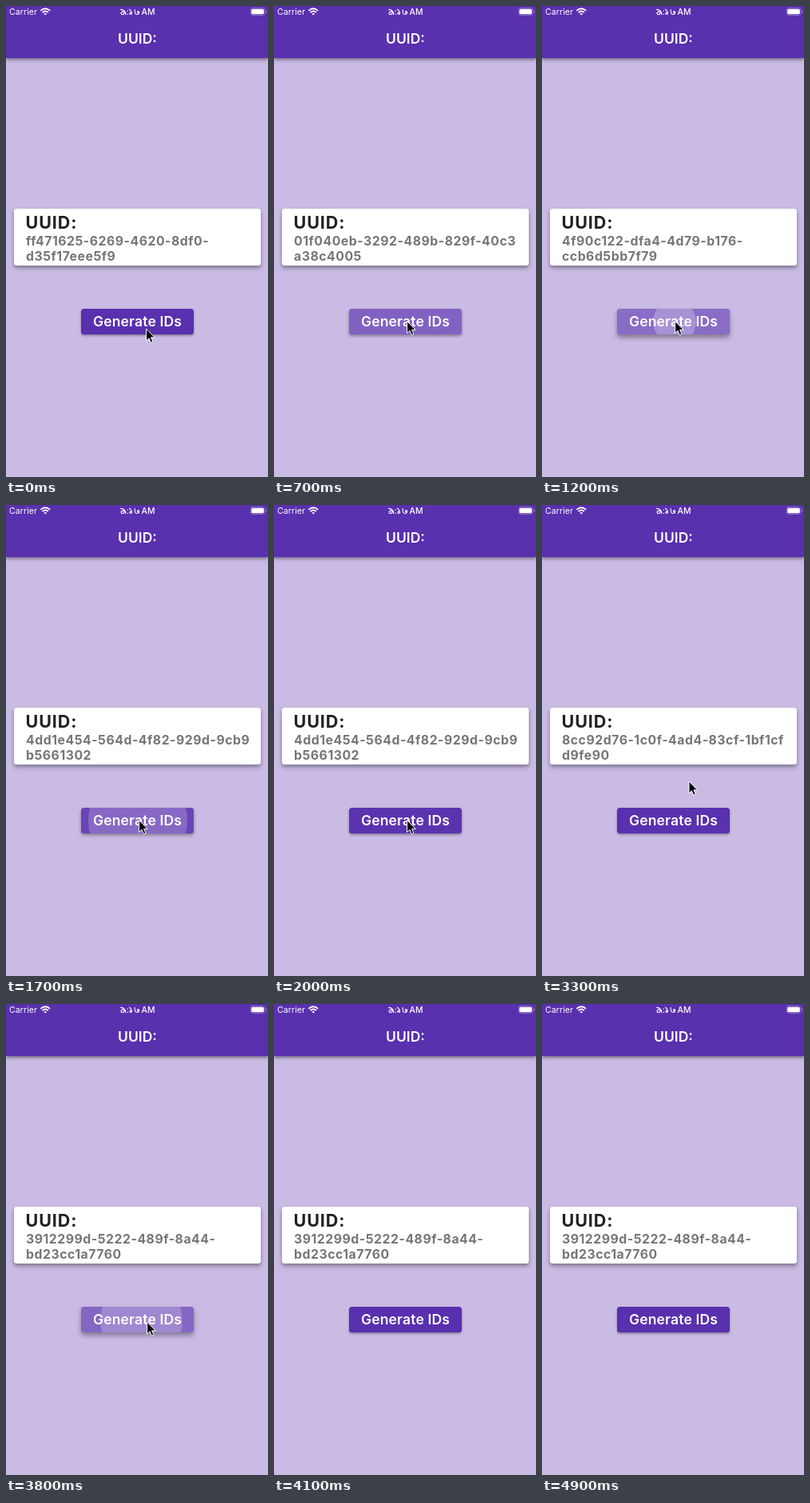
An HTML page for the animation above (5100 ms loop, 328x588 px).

```html
<!DOCTYPE html>
<html lang="en">
<head>
<meta charset="utf-8">
<title>UUID generator</title>
<style>
  html, body { margin: 0; width: 100%; height: 100%; overflow: hidden; }
  body { position: relative; background: #cabbe4; font-family: Inter, Roboto, sans-serif; }
  div, svg { position: absolute; white-space: nowrap; }
  #bar {
    left: 0; top: 0; width: 328px; height: 65px;
    background: #5930ae; color: #fff;
    box-shadow: 0 2px 4px rgba(0, 0, 0, .45);
  }
  #carrier { left: 4px; top: 0; font-size: 10.5px; line-height: 15px; letter-spacing: .1px; }
  #ampm { left: 169.5px; top: 0; font-size: 10.5px; line-height: 15px; font-weight: 500; }
  #heading {
    left: 0; width: 329px; top: 30px; text-align: center;
    font-size: 17.5px; line-height: 22px; font-weight: 600;
  }
  #status { left: 0; top: 0; }
  #card {
    left: 10px; top: 253px; width: 309px; height: 71px;
    border-radius: 3.5px; background: #fff;
    box-shadow: 0 2.5px 4px rgba(0, 0, 0, .3), 0 4px 7px rgba(0, 0, 0, .12);
  }
  #label {
    left: 14.6px; top: 4px; color: #212121;
    font-size: 21.5px; line-height: 27px; font-weight: 700; letter-spacing: .9px;
  }
  #uuid {
    left: 15px; top: 32px; color: #757575;
    font-size: 15.75px; line-height: 18.7px; font-weight: 700; letter-spacing: .55px;
  }
  #button {
    left: 94px; top: 378px; width: 141px; height: 32px;
    border-radius: 3.5px; background: #5930ae; overflow: hidden;
  }
  #tint { inset: 0; background: #fff; }
  #ripple { border-radius: 50%; background: #fff; }
  #caption {
    inset: 0; text-align: center; color: #fff;
    font-size: 17.5px; line-height: 32px; font-weight: 600; letter-spacing: .15px;
  }
  #cursor { left: 0; top: 0; overflow: visible; }
</style>
</head>
<body>
  <div id="bar">
    <div id="carrier">Carrier</div>
    <svg id="status" width="328" height="16" fill="none" stroke="#fff" stroke-width="1.1" stroke-linecap="round">
      <g stroke-width="1.8" stroke-linecap="butt">
        <path d="M43.3 5.9Q49.2 .5 55.1 5.9M45.5 8.2Q49.2 4.9 52.9 8.2"/>
        <path d="M49.2 11.6L47.3 9.7Q49.2 8.2 51.1 9.7Z" fill="#fff" stroke="none"/>
      </g>
      <path d="M149.8 10.6Q149.4 4.8 143.6 4.4M149 7.8Q145.2 6.2 144 8.4Q143.8 10.7 146 10.6Q148 10 149 7.8"/>
      <path d="M152.2 6.2v.1M152.2 10.2v.1" stroke-width="1.4"/>
      <path d="M154.6 4.2Q157.5 6.2 157.6 9Q157.4 10.6 155.9 10.4Q154.4 10 155.2 8.6Q156.2 7.6 157.6 9"/>
      <path d="M161.3 4.5Q160.6 10.5 164 10.5Q167 10.2 166.6 7.5Q165.8 5.8 164.6 7Q164.1 8.4 165.6 8.6"/>
      <rect x="306" y="2.5" width="18" height="9" rx="2.6" stroke-opacity=".3" stroke-width=".9"/>
      <rect x="307.2" y="3.7" width="15.6" height="6.6" rx="1.6" fill="#fff" stroke="none"/>
      <path d="M325.6 5.8v2.4" stroke-opacity=".35"/>
    </svg>
    <div id="ampm">AM</div>
    <div id="heading">UUID:</div>
  </div>
  <div id="card">
    <div id="label">UUID:</div>
    <div id="uuid"></div>
  </div>
  <div id="button">
    <div id="tint"></div>
    <div id="ripple"></div>
    <div id="caption">Generate IDs</div>
  </div>
  <svg id="cursor" width="14" height="20">
    <path d="M0 0V15L3.4 11.8L5.7 17.2L8.3 16.1L6 10.8H10.6Z" fill="#000" stroke="#fff" stroke-width="1"/>
  </svg>
<script>
const LOOP = 5100, STEP = 100, FADE = 200;
const BUTTON = { x: 94, y: 378, w: 141, h: 32 };

const firstId = 'ff471625-6269-4620-8df0-<br>d35f17eee5f9';
const presses = [
  { down: 526, up: 636, x: 167, y: 394, id: '01f040eb-3292-489b-829f-40c3<br>a38c4005' },
  { down: 988, up: 1188, x: 167, y: 394, id: '4f90c122-dfa4-4d79-b176-<br>ccb6d5bb7f79' },
  { down: 1530, up: 1647, x: 167, y: 394, id: '4dd1e454-564d-4f82-929d-9cb9<br>b5661302' },
  { down: 1990, up: 2090, x: 167, y: 394, id: '8cc92d76-1c0f-4ad4-83cf-1bf1cf<br>d9fe90' },
  { down: 3564, up: 3766, x: 177, y: 397, id: '3912299d-5222-489f-8a44-<br>bd23cc1a7760' }
];

// Pointer path: time, x, y
const path = [
  [0, 175.6, 403], [300, 166.6, 393.5], [2200, 166.6, 393.5], [2300, 154, 380], [2400, 122, 346],
  [2500, 88.6, 296], [2600, 74, 220], [2700, 92, 148], [2800, 160, 106], [2900, 213, 98],
  [3100, 205, 190], [3300, 184, 345], [3400, 176.6, 397], [3800, 176.6, 397],
  [3900, 215, 402], [4000, 275, 403], [4100, 340, 403]
];

const $ = id => document.getElementById(id);
const clamp = v => Math.max(0, Math.min(1, v));
const mix = (a, b, k) => a + (b - a) * k;

function pointerAt(t) {
  const i = path.findIndex(p => p[0] > t);
  if (i < 0) return path[path.length - 1].slice(1);
  const [t0, x0, y0] = path[i - 1], [t1, x1, y1] = path[i];
  const k = (t - t0) / (t1 - t0);
  return [mix(x0, x1, k), mix(y0, y1, k)];
}

function drawRipple(press, t) {
  const x = press.x - BUTTON.x, y = press.y - BUTTON.y;
  const full = Math.hypot(Math.max(x, BUTTON.w - x), Math.max(y, BUTTON.h - y));
  // Slow growth while held, fast after release
  const held = Math.min(t, press.up) - press.down;
  const r = Math.min(full, held * full / 1000 + Math.max(0, t - press.up));
  const k = r / full;
  const cx = mix(x, BUTTON.w / 2, k), cy = mix(y, BUTTON.h / 2, k);
  const s = $('ripple').style;
  s.left = cx - r + 'px';
  s.top = cy - r + 'px';
  s.width = s.height = 2 * r + 'px';
  s.opacity = .27 * (1 - clamp((t - press.up) / FADE));
}

let shownId;
function draw(t) {
  const press = presses.filter(p => p.down <= t).pop();
  const done = presses.filter(p => p.up <= t).pop();
  const id = done ? done.id : firstId;
  if (id !== shownId) $('uuid').innerHTML = shownId = id;

  let lit = 0;
  if (press) {
    lit = clamp((Math.min(t, press.up) - press.down) / FADE);
    lit = clamp(lit - Math.max(0, t - press.up) / FADE);
    drawRipple(press, t);
  } else {
    $('ripple').style.opacity = 0;
  }
  $('tint').style.opacity = .31 * lit;
  $('button').style.boxShadow =
    `0 ${mix(1.5, 4.2, lit)}px ${mix(3, 7, lit)}px rgba(0,0,0,.36)`;

  const [x, y] = pointerAt(t);
  $('cursor').style.transform = `translate(${x}px, ${y}px)`;
}

function tick(now) {
  draw(Math.floor(now % LOOP / STEP) * STEP);
  requestAnimationFrame(tick);
}
draw(0);
requestAnimationFrame(tick);
</script>
</body>
</html>
```
